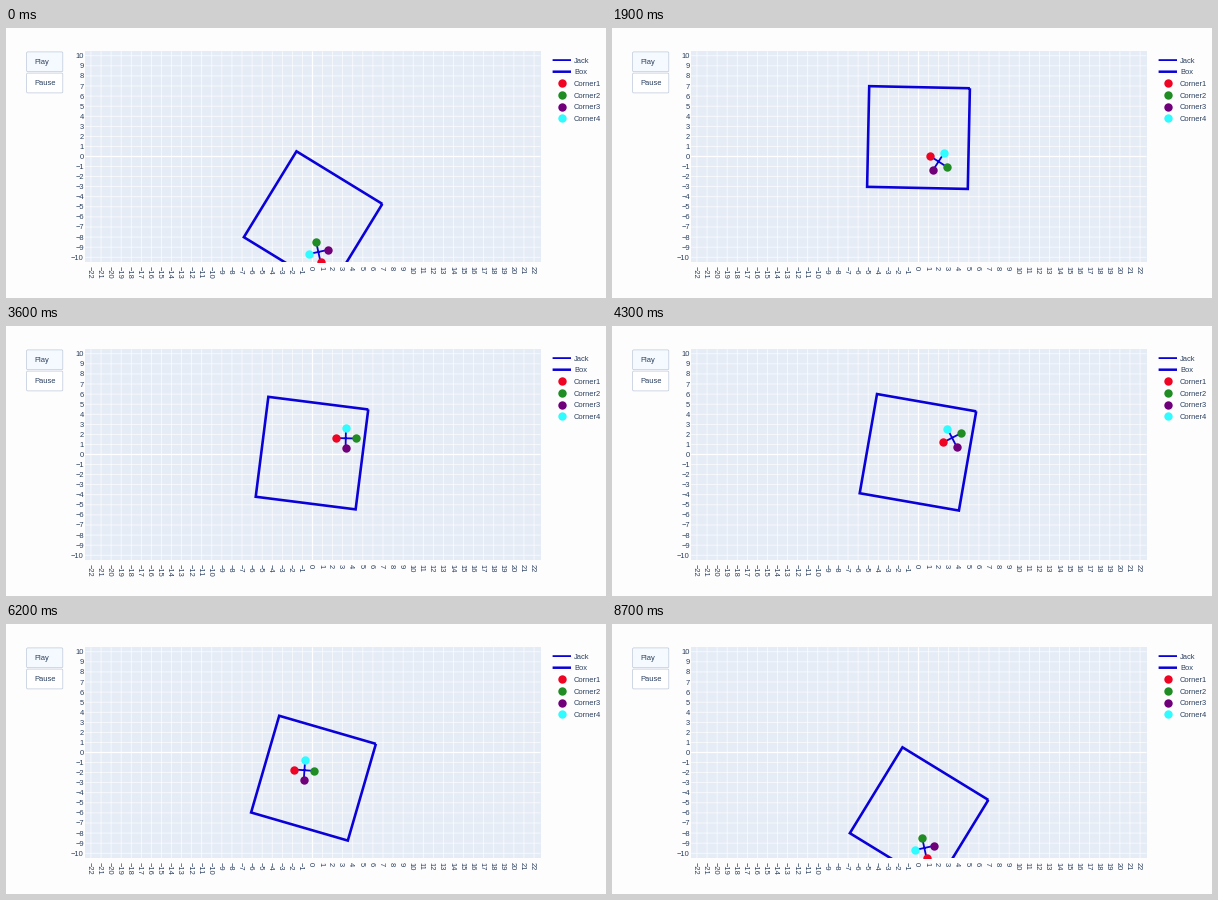
A matplotlib script that plays this animation: 600x270 px, repeating every 8800 ms.

```python
import numpy as np
import matplotlib.pyplot as plt
from matplotlib.animation import FuncAnimation
from matplotlib.patches import Rectangle, FancyBboxPatch

W, H, DPI = 600, 270, 100
FRAMES, STEP = 88, 100
CX, CY, UNIT = 306.5, 128.5, 10.07
INK, BLUE = "#2a3f5f", "#0a00d8"
COLORS = ["#ee0524", "#1f8c24", "#70007a", "#30fbff"]
PT = 72 / DPI

plt.rcParams["font.family"] = "Liberation Sans"
plt.rcParams["font.size"] = 7.5 * PT

# Bodies glide freely, at constant speed and spin, from one contact to the next:
# time (s), box x, y, turn, jack x, y, turn (degrees, counterclockwise)
CONTACTS = np.array([
    (0.10, 0.00, 0.00, 0.0, 0.00, 0.00, 180),
    (0.90, 0.00, 0.00, 0.0, 0.90, 4.00, 180),
    (1.87, 0.00, 1.96, -1.1, 1.99, -0.53, 148),
    (2.95, 0.00, -0.85, -4.4, 1.99, 0.49, 119),
    (3.97, -0.08, 0.70, -8.8, 4.05, 2.25, 213),
    (6.20, 0.10, -2.55, -16.2, -0.80, -1.76, 176),
    (7.20, 0.12, -4.00, -24.8, -1.26, -5.94, 304.5),
    (8.10, 0.06, -6.36, -31.5, 0.58, -9.48, 282.4),
])
BOX = np.array([(5, 5), (5, -5), (-5, -5), (-5, 5), (5, 5)])
JACK = np.array([(1, 0), (-1, 0), (0, 1), (0, -1)])


def place(shape, x, y, turn):
    """Turn and move a shape, and return its pixel coordinates."""
    c, s = np.cos(np.radians(turn)), np.sin(np.radians(turn))
    px, py = shape.T
    return (CX + UNIT * (x + px * c - py * s),
            CY - UNIT * (y + px * s + py * c))


fig = plt.figure(figsize=(W / DPI, H / DPI), dpi=DPI, facecolor="#fdfdfe")
ax = fig.add_axes([0, 0, 1, 1])
ax.set_xlim(0, W)
ax.set_ylim(H, 0)
ax.axis("off")


def label(x, y, s, **kw):
    ax.text(x, y, s, **{"va": "center_baseline", "color": INK, **kw})


def stroke(x, y, width, color, **kw):
    return ax.plot(x, y, color=color, lw=width * PT, solid_capstyle="butt",
                   solid_joinstyle="miter", snap=False, **kw)[0]


def dot(x, y, color, **kw):
    return ax.plot([x], [y], "o", ms=8.4 * PT, mew=0, color=color, snap=False, **kw)[0]


def tick(v):
    return str(v).replace("-", "\u2212")


# Plot area, grid and tick labels
left, right, top, bottom = 79.2, 534.5, 23.3, 234
area = Rectangle((left, top), right - left, bottom - top, fc="#e5ecf6", lw=0)
ax.add_patch(area)

for v in range(-22, 23):
    x = CX + UNIT * v
    stroke([x, x], [top, bottom], 0.65 if v else 1.25, "white")
    label(x - 2, 237.5, tick(v), rotation=270, ha="center", va="top")
for v in range(-10, 11):
    y = CY - UNIT * v
    stroke([left, right], [y, y], 0.65 if v else 1.25, "white")
    label(77.8, y, tick(v), ha="right")

# Buttons
for y, name, fill in [(23.9, "Play", "#f4faff"), (45.1, "Pause", "white")]:
    ax.add_patch(FancyBboxPatch((20.6, y), 36.2, 19.8, fc=fill, ec="#bec8d9", lw=0.7 * PT,
                                boxstyle="round,pad=0,rounding_size=1.2"))
    label(28, y + 9.8, name)

# Legend
names = ["Jack", "Box"] + [f"Corner{k}" for k in range(1, 5)]
for k, name in enumerate(names):
    y = 32.1 + 11.6 * k
    label(568, y + 0.2, name)
    if k < 2:
        stroke([546.6, 565], [y, y], [1.8, 2.5][k], BLUE)
    else:
        dot(555.6, y, COLORS[k - 2])

# Moving parts
jack = stroke([], [], 1.8, BLUE, zorder=5)
box = stroke([], [], 2.6, BLUE, zorder=6)
corners = [dot(0, 0, c, zorder=7) for c in COLORS]
for part in [jack, box, *corners]:
    part.set_clip_path(area)


def update(i):
    t = (i or FRAMES) * STEP / 1000  # the loop opens on the resting pose
    pose = [np.interp(t, CONTACTS[:, 0], col) for col in CONTACTS[:, 1:].T]
    box.set_data(*place(BOX, *pose[:3]))
    x, y = place(JACK, *pose[3:])
    jack.set_data(np.insert(x, 2, np.nan), np.insert(y, 2, np.nan))
    for c, px, py in zip(corners, x, y):
        c.set_data([px], [py])
    return [jack, box, *corners]


anim = FuncAnimation(fig, update, frames=FRAMES, interval=STEP, repeat=True,
                     repeat_delay=0, blit=False)
plt.show()
```
